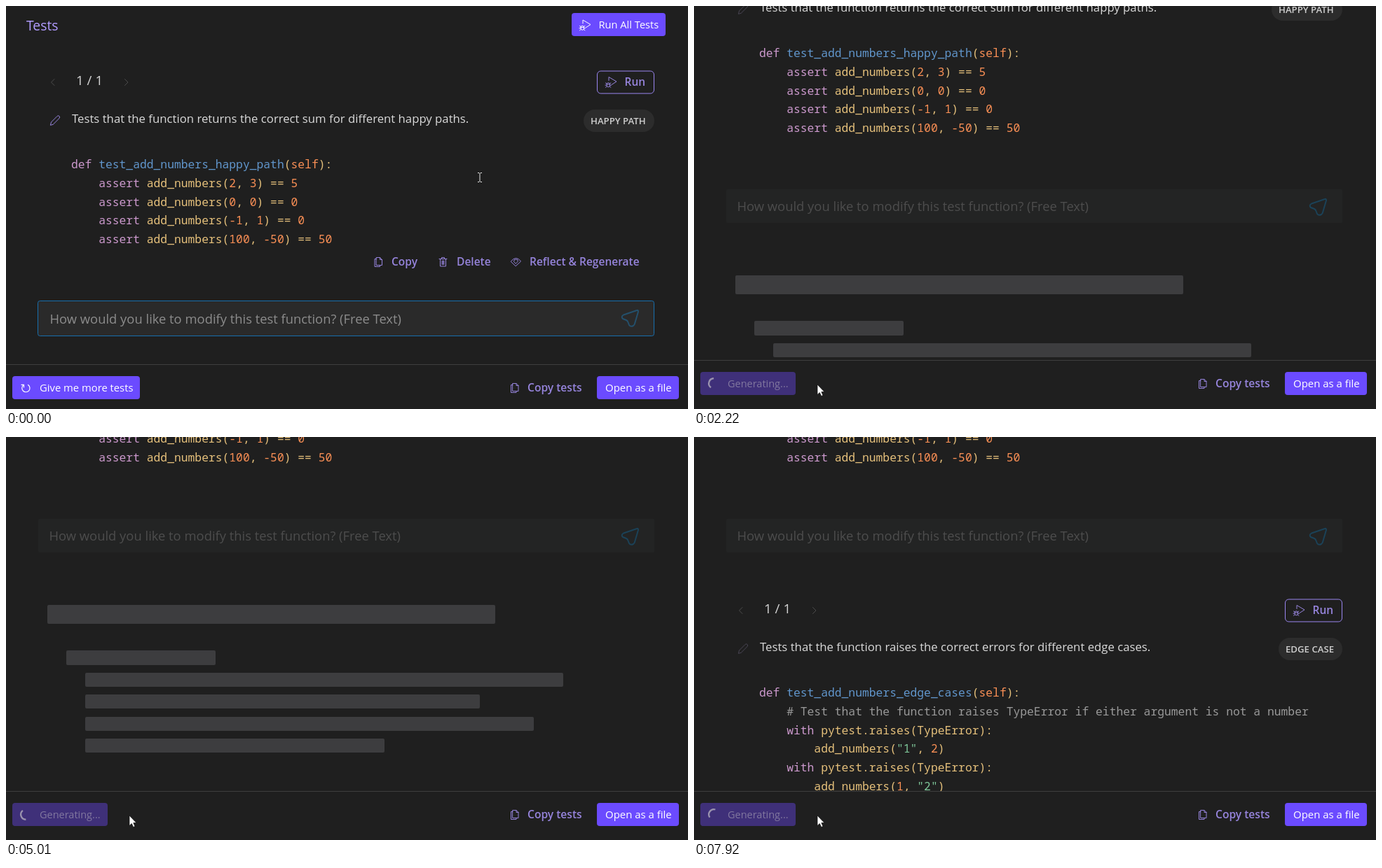
An HTML page that plays this animation: 973 by 576 pixels, repeating every 7.99 s.

```html
<!DOCTYPE html>
<html lang="en">
<head>
<meta charset="utf-8">
<title>Tests</title>
<style>
  html, body { margin: 0; width: 100%; height: 100%; overflow: hidden; background: #1f1f1f; }
  svg { display: block; width: 973px; height: 576px; }
  text { font-family: "Open Sans", "Noto Sans", sans-serif; white-space: pre; }
  .code { font: 500 16.33px "Noto Sans Mono", "DejaVu Sans Mono", monospace; fill: #e5c07b; }
  .icon { fill: none; stroke-linejoin: round; stroke-linecap: round; }
</style>
</head>
<body>
<svg id="stage" viewBox="0 0 973 576"></svg>
<script>
const LOOP = 7990, GENERATE = 1950, LOADED = 5400;
const LILAC = '#9684dc', VIOLET = '#6b4bff';

const text = (x, y, str, size, fill, weight = 400) =>
  `<text x="${x}" y="${y}" font-size="${size}" fill="${fill}" font-weight="${weight}">${str}</text>`;
const box = (x, y, w, h, r, fill, more = '') =>
  `<rect x="${x}" y="${y}" width="${w}" height="${h}" rx="${r}" fill="${fill}" ${more}/>`;
const icon = (x, y, d, color, more = '') =>
  `<path class="icon" transform="translate(${x} ${y})" d="${d}" stroke="${color}" ${more}/>`;

// icon outlines, each drawn from its own top left corner
const RUN = 'M5.5 6V1L16.5 7.5L9.5 12M2.5 11.5a2.2 2.2 0 0 1 4.4 0v1.6a2.2 2.2 0 0 1-4.4 0zM2.5 11.5H6.9M1 9.5l1.6 1M8.4 9.5l-1.6 1M.5 12.7h2M6.9 12.7h2M1 15.8l1.6-1.3M8.4 15.8l-1.6-1.3';
const COPY = 'M3.5 1H8.5L11.5 4V12H3.5ZM8.5 1V4H11.5M3.5 3H1V14H8.5V12';
const TRASH = 'M0 2.5H11M3.5 2.5V.5H7.5V2.5M1.5 2.5V13H9.5V2.5M4 5V10.5M5.5 5V10.5M7 5V10.5';
const REFLECT = 'M0 4.5Q3 0 7 0T14 4.5L7 11ZM4 4.5a3 3 0 1 1 6 0L7 7.5Z';
const REFRESH = 'M3 2.2A5.6 5.6 0 1 0 9.5 2M3.5 5.5V1.8H0';
const PENCIL = 'M1 14L2 10L10.5 1.5Q12.2 0 13.5 1.5T13.5 4.5L5 13Z';
const SEND = 'M22 1L3 7.5Q-1 10 2 13L7 15Q9 16 9.5 18L11 22Q13 25 17 23Q18.5 22 19 20L24 3Q24 0 22 1Z';

const COLORS = { word: '#cc99cd', name: '#6196cc', value: '#f98f55', string: '#7ec699', note: '#999' };
const SYNTAX = /(?<note>#.*)|(?<string>"[^"]*")|(?<word>\b(?:def|assert|with)\b)|(?<name>\btest_\w+)|(?<value>\bself\b|-?\b\d+)/g;
const highlight = line => line.replace(SYNTAX, (match, ...rest) => {
  const groups = rest.at(-1);
  const kind = Object.keys(groups).find(k => groups[k]);
  return `<tspan fill="${COLORS[kind]}">${match}</tspan>`;
});

function testCase(title, label, badgeX, lines) {
  return icon(64, 104.5, 'M5 0L.5 4.5L5 9', '#4c4c4c') + text(100, 113, '1 / 1', 18.8, '#d4d4d4') +
    icon(169, 104.5, 'M.5 0L5 4.5L.5 9', '#4c4c4c') +
    box(843.5, 93, 81, 32, 5, 'none', 'stroke="#9a86f0"') +
    icon(854.5, 100.5, RUN, LILAC) + text(882.5, 114, 'Run', 15.5, LILAC, 600) +
    icon(62.5, 156, PENCIL, LILAC, 'data-pencil') +
    text(94, 167, title, 16.74, '#dadada') +
    box(badgeX, 148, 925 - badgeX, 32, 16, '#2c2c2c') +
    text(badgeX + 10, 169, label, 13.2, '#cfcfcf', 600) +
    lines.map((line, i) => `<text class="code" x="93" y="${232 + i * 26.8}">${highlight(line)}</text>`).join('');
}

const happy = testCase('Tests that the function returns the correct sum for different happy paths.', 'HAPPY PATH', 824, [
  'def test_add_numbers_happy_path(self):',
  '    assert add_numbers(2, 3) == 5',
  '    assert add_numbers(0, 0) == 0',
  '    assert add_numbers(-1, 1) == 0',
  '    assert add_numbers(100, -50) == 50'
]);
const edge = testCase('Tests that the function raises the correct errors for different edge cases.', 'EDGE CASE', 834, [
  'def test_add_numbers_edge_cases(self):',
  '    # Test that the function raises TypeError if either argument is not a number',
  '    with pytest.raises(TypeError):',
  '        add_numbers("1", 2)',
  '    with pytest.raises(TypeError):',
  '        add_numbers(1, "2")'
]);

const prompt = 'How would you like to modify this test function? (Free Text)';
const skeleton = [[59, 544, 639, 27], [86, 609, 213, 21], [113, 641, 682, 20],
  [113, 672, 563, 20], [113, 704, 640, 20], [113, 735, 427, 20]]
  .map(([x, y, w, h]) => box(x, y, w, h, 2, '#3d3d3f')).join('');

document.getElementById('stage').innerHTML = `
<g id="page">
  ${text(29, 35, 'Tests', 19.4, '#b19cff')}
  ${box(807, 10, 134, 33, 4, VIOLET)}
  ${icon(817.5, 19, RUN, '#fff')}${text(845.5, 32, 'Run All Tests', 14.65, '#fff')}
  ${happy}
  <g id="actions">
    ${icon(525, 358.5, COPY, LILAC)}${text(550, 371, 'Copy', 15.5, LILAC, 600)}
    ${icon(618, 359, TRASH, LILAC)}${text(643, 371, 'Delete', 15.5, LILAC, 600)}
    ${icon(720.5, 360.5, REFLECT, LILAC)}${text(747, 371, 'Reflect &amp; Regenerate', 15.5, LILAC, 600)}
  </g>
  <g id="input">
    ${box(45.5, 421.5, 879, 50, 3, '#2a2a2a', 'stroke="#176fae"')}
    ${text(62.5, 454, prompt, 18.37, '#8c8c8c')}
    ${icon(878, 434, SEND, '#24506c', 'stroke-width="2"')}
  </g>
  <g id="inputOff">
    ${box(46, 421, 879, 48, 2, '#232424')}
    ${text(61.5, 452, prompt, 18.37, '#4d4d4d')}
    ${icon(878, 434, SEND, '#1b4258', 'stroke-width="2"')}
  </g>
  <g id="skeleton">${skeleton}</g>
  <g id="edge" transform="translate(0 443)">${edge}</g>
</g>
<g id="footer">
  ${box(0, 512, 973, 80, 0, '#1f1f1f')}${box(0, 512, 973, 1, 0, '#3e3e3e')}
  <g id="more">
    ${box(9, 529, 182, 33, 4, VIOLET, 'id="moreBox"')}
    ${icon(22, 539.5, REFRESH, '#fff', 'stroke-width="1.2"')}${text(48, 551, 'Give me more tests', 14.8, '#fff')}
  </g>
  <g id="busy">
    ${box(9, 529, 136, 33, 4, '#3f3079')}
    <path id="spinner" d="M2.5-6.8A7.2 7.2 0 0 1 2.5 6.8" fill="none" stroke="#9a93ae" stroke-width="2.3"/>
    ${text(48, 551, 'Generating...', 14.5, '#81779f')}
  </g>
  ${icon(719.5, 538.5, COPY, LILAC)}${text(744, 551, 'Copy tests', 15.6, LILAC, 600)}
  ${box(843, 529, 117, 33, 4, VIOLET)}${text(855, 551, 'Open as a file', 14.95, '#fff')}
</g>
<g id="cursor">
  <path id="arrow" d="M0 0V14.5L3.3 11.5L5.6 16.5L8 15.5L5.8 10.5H10Z" fill="#fff" stroke="#111" stroke-width=".7"/>
  <path id="beam" d="M-3-6.5H-1L0-5.5L1-6.5H3M0-5.5V5.5M-3 6.5H-1L0 5.5L1 6.5H3" fill="none" stroke="#e8e8e8"/>
</g>`;

const $ = id => document.getElementById(id);
const show = (id, on) => { $(id).style.display = on ? '' : 'none'; };
const move = (id, x, y) => $(id).setAttribute('transform', `translate(${Math.round(x)} ${Math.round(y)})`);
const part = (t, from, to) => Math.min(1, Math.max(0, (t - from) / (to - from)));
const quadInOut = p => p < .5 ? 2 * p * p : 1 - 2 * (1 - p) ** 2;
const cubicInOut = p => p < .5 ? 4 * p ** 3 : 1 - 4 * (1 - p) ** 3;
const quadOut = p => 1 - (1 - p) ** 2;

function pointer(t) {
  const a = quadInOut(part(t, 260, 1030));
  const b = part(t, 1030, 1170);
  const c = quadOut(part(t, 1170, 1870));
  return [676 - 426 * a - 16 * b - 58 * c, 245 + 251 * a + 15 * b + 30 * c];
}

function draw(now) {
  const t = now % LOOP;
  const busy = t >= GENERATE, loaded = t >= LOADED;

  const [x, y] = pointer(t);
  const overText = y < 345 || (y > 421 && y < 471);
  move('cursor', x, y);
  show('beam', overText);
  show('arrow', !overText);
  show('actions', y < 475);
  $('moreBox').setAttribute('fill', x < 191 && y > 529 ? '#5f41ea' : VIOLET);

  move('page', 0, -304 * cubicInOut(part(t, 2037, 2399)));
  move('footer', 0, -6 * part(t, 2050, 2200));
  show('input', !busy);
  show('inputOff', busy);
  show('more', !busy);
  show('busy', busy);
  show('skeleton', busy && !loaded);
  show('edge', loaded);
  document.querySelectorAll('[data-pencil]').forEach(p => p.setAttribute('stroke', busy ? '#4a4655' : LILAC));
  $('spinner').setAttribute('transform', `translate(28.5 545.5) rotate(${90 + (t - 2080) * .7611})`);

  requestAnimationFrame(() => draw(performance.now()));
}
draw(performance.now());
</script>
</body>
</html>
```
